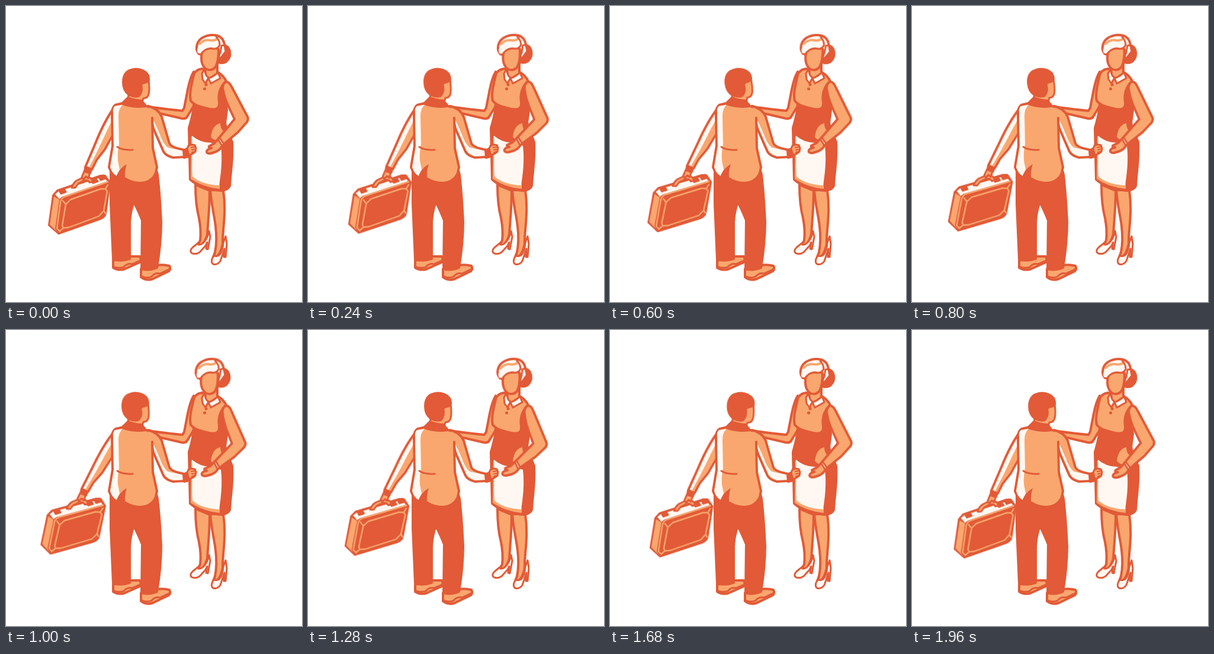
An HTML page for the animation above (2 s loop, 500x500 px).

```html
<!DOCTYPE html>
<html lang="en">
<head>
<meta charset="utf-8">
<title>Business greeting</title>
<style>
  html, body { margin: 0; width: 100%; height: 100%; overflow: hidden; background: #fff; }
  svg { display: block; width: 100vw; height: 100vh; }
  path { stroke: #e25a37; stroke-width: 4; stroke-linejoin: round; stroke-linecap: round; fill: none; }
  .o { fill: #f9a76f; }
  .r { fill: #e25a37; }
  .w { fill: #fff8f2; }
  .flat { stroke: none; }
  .thin { stroke-width: 3; }
  .trim { stroke: #f9a76f; stroke-width: 2.4; }
  .move { animation: 2s linear infinite; }
  .carry { transform-origin: 183px 175px; animation-name: carry; }
  .nod { transform-origin: 218px 158px; animation-name: nod; }
  .tilt { transform-origin: 345px 112px; animation-name: tilt; }
  .elbow { transform-origin: 375px 132px; animation-name: elbow; }
  @keyframes carry {
    0%, 100% { transform: rotate(0deg); }
    50% { transform: rotate(3.8deg); }
  }
  @keyframes nod {
    0%, 100% { transform: rotate(0deg); }
    30% { transform: rotate(-5deg); }
    82% { transform: rotate(2.8deg); }
  }
  @keyframes tilt {
    0%, 100% { transform: rotate(0deg); }
    15% { transform: rotate(-1.8deg); }
    32% { transform: rotate(1deg); }
    58% { transform: rotate(-3deg); }
    92% { transform: rotate(.7deg); }
  }
  @keyframes elbow {
    0%, 100% { transform: rotate(0deg); }
    16% { transform: rotate(4.9deg); }
    34% { transform: rotate(.8deg); }
    60% { transform: rotate(6.3deg); }
    92.5% { transform: rotate(-1deg); }
  }
</style>
</head>
<body>
<svg viewBox="0 0 500 500">
  <g id="woman">
    <!-- legs and shoes -->
    <path class="o" d="M320 302C320 325 322 343 326 358Q330 378 328 396L324 404Q334 406 340 386C341 368 344 342 344 312Z"/>
    <path class="o" d="M345 311C347 337 352 354 354 372Q357 397 353 416L350 424Q361 426 366 402C365 380 373 350 367 311Z"/>
    <path class="w thin" d="M326 399L315 408Q310 413 313 417Q319 421 327 416L337 405L340 399L338 410L341 411L345 390L343 380Q341 391 335 398Q330 404 325 403Z"/>
    <path class="w thin" d="M353 418L348 427Q346 434 350 436Q357 438 362 431L367 416L369 410L368 424L371 424L373 402L371 389L367 400Q366 414 361 420Q357 424 352 422Z"/>

    <!-- far arm -->
    <path class="o" d="M317 111Q311 121 307 141L301 172L298 177Q276 175 247 171L254 180L297 190Q304 191 306 187L317 169Z"/>

    <!-- dress -->
    <path class="r" d="M317 165C317 181 312 195 309 206L311 293C324 305 345 311 364 312Q374 311 378 304C379 280 384 260 382 230L373 207Q369 199 371 191L373 176L369 145L360 130Z"/>
    <path class="o flat" d="M313 220L318 223L361 300L361 309Q332 306 312 292Z"/>
    <path class="w flat" d="M314 219Q328 231 346 231L363 236C366 260 363 284 360 303C343 302 326 298 315 288C313 265 316 240 314 219Z"/>
    <path class="o flat" d="M346 221C348 207 353 200 362 198Q362 208 369 213L358 228Q349 226 346 221Z"/>
    <path class="o" d="M331 106Q319 108 317 117C314 131 309 147 312 160C319 169 331 171 344 174Q362 177 360 162C358 150 361 136 372 127Q368 118 358 112Z"/>

    <!-- neck and collar -->
    <path class="o" d="M336 101L337 117L342 124L357 114L357 96Z"/>
    <path class="w thin" d="M334 109L331 114L332 124L337 131L342 121Q337 118 336 110Z"/>
    <path class="w thin" d="M342 122L346 131L362 122L358 112Q352 119 342 122Z"/>
    <path d="M338 133h.1M335.500 140h.1" style="stroke-width:5"/>

    <g class="move tilt">
      <path class="r" d="M362 66Q376 65 378 77Q380 87 372 94Q365 98 358 95Z"/>
      <path class="w" d="M329 82Q323 80 322 73Q321 61 331 54Q343 47 357 50Q367 53 369 65L371 77L360 92L357 76Z"/>
      <path class="o" d="M331 79C328 93 332 103 339 107Q347 110 353 104C358 97 359 84 359 73Q347 67 334 75Z"/>
      <path class="w flat" d="M324 80Q321 72 328 66Q336 61 347 62Q357 61 357 54Q364 62 359 70Q355 72 347 70Q336 69 329 81Z"/>
      <path class="trim" style="stroke-width:4" d="M327 64Q335 56 345 58Q353 59 357 55"/>
      <path class="thin" d="M325 81L329 82Q336 71 347 72Q357 74 361 66Q361 58 355 52"/>
      <path class="w thin" d="M364 67L369 66L371 77L360 91Q359 84 362 79Z"/>
    </g>

    <g class="move elbow">
      <path class="o" d="M367 143Q364 133 371 128Q377 127 382 138L408 187Q410 191 407 196L392 213L366 235Q363 242 355 246L346 249Q339 250 339 246Q339 243 344 241L347 240Q342 240 343 237L352 232L358 225L386 191L376 170Q369 155 367 143Z"/>
      <path class="w thin" d="M358 225L361 223L368 233L365 236Z"/>
    </g>
  </g>

  <g id="man">
    <g class="move carry">
      <!-- briefcase -->
      <path class="r" d="M80 320L87 312L160 287L167 287L175 298L168 350Q167 356 160 359L89 384L73 370Z"/>
      <path class="w flat" d="M83 318L89 313L162 289L166 290L171 296L95 322L90 326Z"/>
      <path class="o flat" d="M81 322L90 327L83 376L86 381L74 369Z"/>
      <path class="trim" d="M91 381L86 376L92 331Q93 325 99 322L172 297"/>
      <path class="trim" d="M109 327L160 309L168 309L171 313L165 346L157 355L106 374L97 375L95 371L101 335ZM101 335L96 329M168 309L172 302M165 346L168 350M97 375L91 380"/>
      <path class="r thin" d="M90 312L98 309L101 314L93 317ZM144 294L151 291L155 296L147 299ZM157 289L165 286L168 291L160 294Z"/>
      <path class="o thin" d="M111 307Q113 300 119 295L131 289Q141 287 145 293L146 297L141 298Q139 293 131 295L122 300L117 307Z"/>

      <!-- near hand and sleeve -->
      <path class="o thin" d="M132 279L128 289L131 293L135 288L139 291L142 281Z"/>
      <path class="w" d="M183 171C172 186 159 212 151 232L134 272L145 276L153 260L167 242L181 216Z"/>
      <path class="o flat" d="M181 190C171 208 164 226 154 246L140 273L144 274L152 258L165 241L180 215Z"/>
      <path class="r" d="M134 273L144 276L142 282L133 279Z"/>
    </g>

    <!-- shoes and trousers -->
    <path class="o" d="M181 430L181 442Q189 447 199 445L226 433Q229 428 226 423L211 423Z"/>
    <path class="thin" d="M181 440Q189 444 199 441Q205 434 213 436L227 430"/>
    <path class="o" d="M228 444L228 458Q237 465 248 461L275 448Q279 444 276 439Q266 436 255 438Z"/>
    <path class="thin" d="M228 456Q237 461 246 457Q252 450 260 452L277 444"/>
    <path class="r" d="M177 276L177 335L181 428Q196 432 209 427L209 365Q210 347 216 331Q225 349 230 362L229 444Q241 448 255 442Q262 400 262 365Q260 320 256 285L252 270Z"/>

    <!-- jacket -->
    <path class="o" d="M198 164L185 167Q179 171 179 182L180 236L174 272Q178 284 188 288L202 292Q213 299 227 299Q246 298 253 282L255 272L248 240L247 190L255 176L234 168Z"/>
    <path class="w flat" d="M184 169L197 167Q190 173 190 186L191 233Q188 247 189 261L192 276L187 287Q179 283 176 272L182 237L181 181Q180 172 184 169Z"/>
    <path class="r flat" d="M204 267Q199 282 202 295L186 290Q189 276 204 267Z"/>
    <path class="thin" d="M188 238Q197 244 214 243"/>

    <!-- reaching arm -->
    <path class="o" d="M240 169Q257 173 263 187L276 232Q279 239 301 243L301 255L282 256Q270 253 266 246L252 214Q247 201 247 189"/>
    <path class="w flat" d="M249 193Q255 205 260 217Q265 232 273 239L300 245L300 253L282 254Q272 251 268 245L254 213Q249 204 249 193Z"/>
    <path class="r" d="M300 244L306 241L309 254L301 256Z"/>
    <path class="o thin" d="M306 241L308 236L313 234L319 235L321 240L320 246L316 249L309 252Z"/>
    <path class="thin" style="stroke-width:2" d="M313 239L320 238M314 243L321 242M314 247L319 246"/>

    <g class="move nod">
      <path class="o thin" d="M207 148L206 160L230 163L232 156Q239 156 241 149Q243 141 241 125L224 124Z"/>
      <path class="r" d="M208 150Q198 143 198 129Q198 114 208 109Q220 104 231 109Q242 114 241 125Q239 129 231 130L228 133Q231 145 224 152Q217 154 208 150Z"/>
    </g>
    <path class="r" d="M196 165L206 155Q216 159 229 160L236 169Q214 172 196 165Z"/>
  </g>
</svg>
</body>
</html>
```
